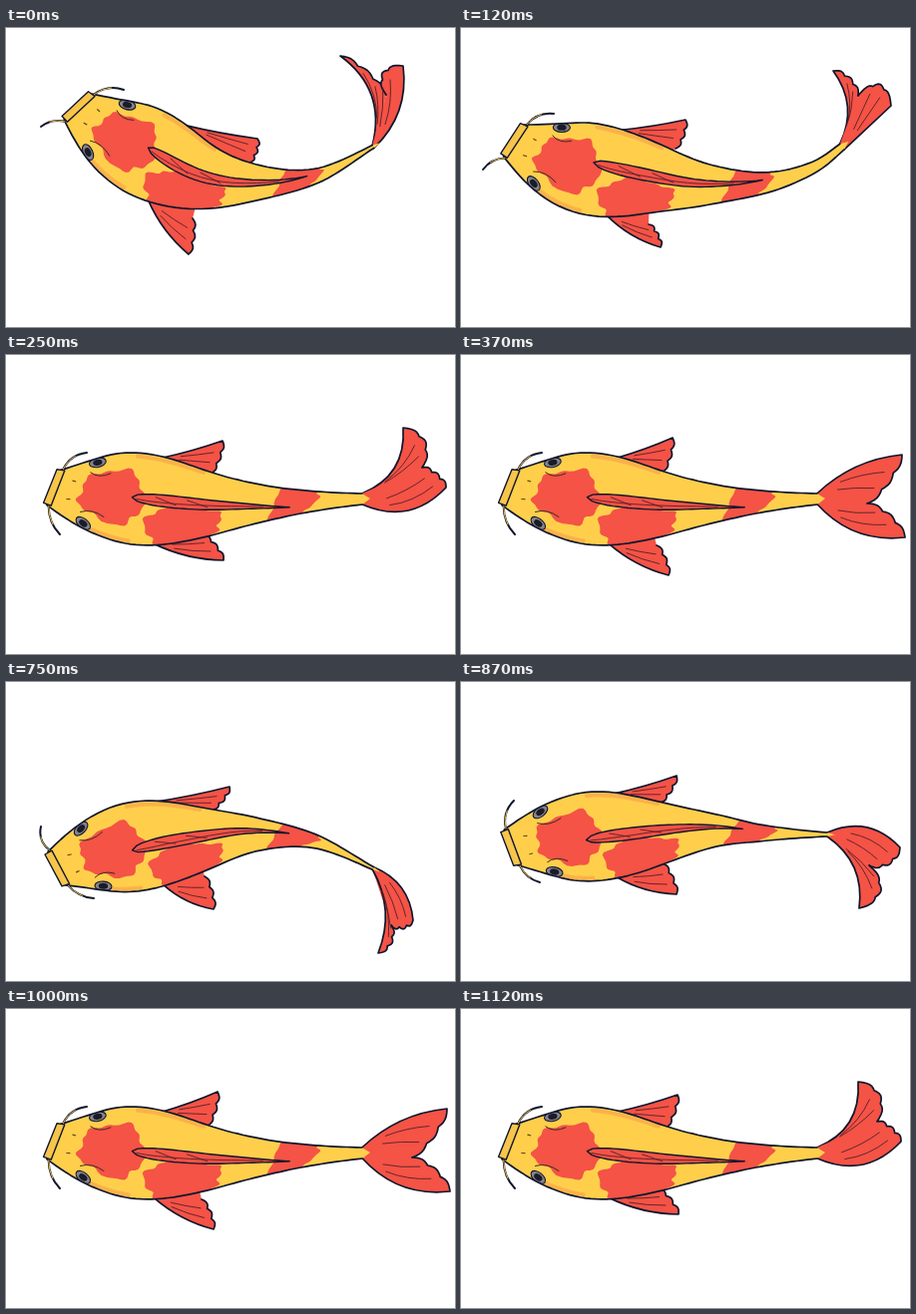
Write an HTML page that moves like this. It is 450 px wide and 300 px high and loops after 1250 ms.

```html
<!DOCTYPE html>
<html lang="en">
<head>
<meta charset="utf-8">
<title>Swimming koi</title>
<style>
html, body { margin: 0; width: 100%; height: 100%; overflow: hidden; background: #fff; }
svg { display: block; width: 100vw; height: 100vh; }
</style>
</head>
<body>
<svg id="stage" viewBox="0 0 450 300"></svg>
<script>
const YELLOW = '#ffcf4b', RED = '#f45346', ORANGE = '#fbb24a', INK = '#10162c';
const LOOP = 1250, PI = Math.PI;

// spine: mouth to tail base; tilt: turn of the mouth; thin: slimming of the rear
// crest: start, end, offset at both, sag; fins: outer and inner corner of each
// tail: tip x, y, bend of the leading edge, bow of the rim
const up = {
  spine: [[72, 79], [125, 116], [190, 147], [250, 155], [312, 148], [368, 119]],
  tilt: 0.2, thin: 3, crest: [82, 250, -5, -2, 4],
  whiskers: [[118, 62], [35, 99]],
  fins: [[[252, 111], [244, 135]], [[183, 227], [187, 191]]],
  tail: [[335, 28, 16, 4], [398, 38, 11, 12]], notch: [381, 67]
};
const rising = {
  spine: [[53, 113], [115, 138], [187, 150], [245, 157], [306, 155], [353, 140], [382, 119]],
  tilt: 0.18, thin: 0, crest: [84, 256, -7, -3, 4],
  whiskers: [[93, 86], [22, 142]],
  fins: [[[225, 92], [215, 121]], [[200, 220], [188, 197]]],
  tail: [[373, 43, 11, 5], [431, 78, 0, 15]], notch: [398, 68]
};
const level = {
  spine: [[48, 133], [120, 143], [190, 149], [250, 149], [300, 147], [357, 144.5]],
  tilt: 0.24, thin: 0, crest: [79, 237, -1, 5, -1],
  whiskers: [[81, 98], [54, 180]],
  fins: [[[212, 83], [202, 117]], [[208, 221], [196, 191]]],
  tail: [[442, 100, -8, 4], [445, 183, 12, 5]], notch: [407, 149]
};
const flick = {
  ...level,
  fins: [[[217, 86], [205, 119]], [[218, 206], [197, 180]]],
  tail: [[398, 73, 14, 12], [441, 133, 15, 3]], notch: [417, 113]
};
const falling = {
  spine: [[50, 166], [120, 156], [175, 153], [250, 149], [300, 151.5], [367, 153]],
  tilt: -0.22, thin: 3, crest: [76, 233, 3, -3, -3],
  whiskers: [[53, 119], [79, 201]],
  fins: [[[216, 94], [199, 121]], [[216, 213], [202, 182]]],
  tail: [[440, 166, -13, 7], [399, 227, -12, 15]], notch: [409, 184]
};
const down = {
  spine: [[51, 187], [120, 167], [190, 158], [250, 153], [310, 160], [368, 187]],
  tilt: -0.2, thin: 3, crest: [78, 236, 3, -3, -3],
  whiskers: [[35, 145], [88, 217]],
  fins: [[[224, 105], [206, 128]], [[208, 228], [199, 195]]],
  tail: [[408, 239, -10, 4], [373, 272, -10, 6]], notch: [386, 244]
};

const timeline = [
  [0, up], [120, rising], [250, flick], [370, level], [620, falling],
  [750, down], [870, falling], [1000, level], [1120, flick]
];

const mix = (p, q, t) => [p[0] + (q[0] - p[0]) * t, p[1] + (q[1] - p[1]) * t];
const shift = (p, n, d) => [p[0] + n[0] * d, p[1] + n[1] * d];
const range = (n, f) => Array.from({ length: n + 1 }, (_, i) => f(i / n));
const poly = pts => 'M' + pts.map(p => p.map(v => v.toFixed(1))).join('L');

function normal(p, q) {
  const dx = q[0] - p[0], dy = q[1] - p[1], len = Math.hypot(dx, dy);
  return [-dy / len, dx / len];
}

// Curve from p to q whose middle lies "bend" off the chord.
const arc = (p, q, bend) =>
  `M${p}Q${shift(mix(p, q, 0.5), normal(p, q), 2 * bend)} ${q}`;

const path = (d, fill, stroke = 'none', width = 0, more = '') =>
  `<path d="${d}" fill="${fill}" stroke="${stroke}" stroke-width="${width}" ${more}/>`;
const ink = (d, width = 1.7) => path(d, 'none', INK, width);

// Catmull-Rom spline through all points.
function spline(pts) {
  return 'M' + pts[0] + pts.slice(1).map((b, i) => {
    const a = pts[i], before = pts[i - 1] || a, after = pts[i + 2] || b;
    const c1 = a.map((v, k) => v + (b[k] - before[k]) / 6);
    const c2 = b.map((v, k) => v - (after[k] - a[k]) / 6);
    return `C${c1} ${c2} ${b}`;
  }).join('');
}

// Half the body width at distance s from the mouth.
const girth = s => s < 85 ? 19 + 27 * Math.sin(PI / 2 * s / 85) : 46 / Math.cosh((s - 85) / 80);

// Maps distance along the spine and side (-1 upper edge, 1 lower edge) to the stage.
function bodyMap(p) {
  const el = document.createElementNS('http://www.w3.org/2000/svg', 'path');
  el.setAttribute('d', spline(p.spine));
  const len = el.getTotalLength();
  const clamp = s => Math.min(len, Math.max(0, s));
  const half = s => girth(s) - p.thin * Math.min(1, s / 200);
  const angle = s => {
    const a = el.getPointAtLength(clamp(s - 3)), b = el.getPointAtLength(clamp(s + 3));
    return Math.atan2(b.y - a.y, b.x - a.x) + p.tilt * Math.max(0, 1 - s / 60);
  };
  const place = (s, side) => {
    const c = clamp(s), { x, y } = el.getPointAtLength(c), a = angle(c);
    const along = s - c, off = side * half(c);
    return [x + along * Math.cos(a) - off * Math.sin(a), y + along * Math.sin(a) + off * Math.cos(a)];
  };
  return { len, half, angle, place };
}

// Fin with a bent leading edge, a scalloped rim and rays.
function fan(root, tip, end, back, bend, bow) {
  const n = normal(tip, end), mid = mix(tip, end, 0.5);
  const out = Math.sign(n[0] * (mid[0] - root[0]) + n[1] * (mid[1] - root[1]));
  const rim = t => shift(mix(tip, end, t), n,
    out * (4 * bow * t * (1 - t) + 2.5 * Math.abs(Math.sin(3 * PI * t))));
  const edge = arc(root, tip, bend) + poly(range(18, rim)).replace('M', 'L');
  const rays = [0.3, 0.65].map(t => arc(root, rim(t), bend * (1 - t)));
  return path(edge + 'L' + back, RED) + ink(edge) +
    rays.map(d => path(d, 'none', '#54202a', 0.9,
      'pathLength="10" stroke-dasharray="5.5 20" stroke-dashoffset="-3.2"')).join('');
}

// Wobbly patch on the skin; "lean" slants it.
function patch(place, s, side, long, wide, seed, lean = 0) {
  const soft = v => Math.sign(v) * Math.abs(v) ** 0.8;
  return path(poly(range(60, t => {
    const a = 2 * PI * t;
    const r = 1 + 0.08 * Math.sin(5 * a + seed) + 0.05 * Math.sin(11 * a + 2 * seed);
    const v = side + wide * r * soft(Math.sin(a));
    return place(s + long * r * soft(Math.cos(a)) - lean * v, v);
  })) + 'Z', RED);
}

function crest({ place, half }, [from, to, d0, d1, sag]) {
  const at = (t, side) => {
    const s = from + (to - from) * t;
    const off = d0 + (d1 - d0) * t + sag * Math.sin(PI * t);
    return place(s, (off + side * 6 * Math.sin(PI * Math.sqrt(t))) / half(s));
  };
  const edge = side => range(30, t => at(t, side));
  const ray = t => arc(at(t, -0.5), at(t + 0.13, 0.5), 0);
  return path(poly([...edge(-1), ...edge(1).reverse()]), RED, INK, 1.4) +
    path(poly(range(12, t => at(0.03 + 0.8 * t, 0.4 - t * 0.4))) + [0.15, 0.35].map(ray).join(''),
      'none', '#54202a', 0.9);
}

function eye({ place, angle }, side) {
  const [x, y] = place(37, side * 0.87);
  const turn = angle(37) * 180 / PI + side * 25;
  return `<g transform="translate(${x} ${y}) rotate(${turn})">
    <ellipse rx="8.5" ry="4.7" fill="#85848c" stroke="${INK}" stroke-width="1.1"/>
    <ellipse rx="4.7" ry="3" fill="#1b1b29"/></g>`;
}

function face(map, side) {
  const { place } = map;
  const brow = `M${place(32, side * 0.6)}Q${place(42, side * 0.4)} ${place(54, side * 0.53)}`;
  const nostril = arc(place(16, side * 0.36), place(19, side * 0.33), 0);
  return path(brow, 'none', '#3a2b20', 1) + path(nostril, 'none', '#6b4a20', 1.2);
}

function whisker(root, tip, bend) {
  const d = arc(root, tip, bend);
  return ink(d, 2) + path(d, 'none', '#e5b84a', 1, 'pathLength="10" stroke-dasharray="6 20"');
}

function koi(p, id) {
  const map = bodyMap(p), { place, len } = map;
  const sides = [-1, 1];
  const [top, low] = sides.map(v => range(60, t => place(len * t, v)));
  const body = poly([...top, place(len + 8, 0), ...low.reverse()]) + 'Z';
  const roots = sides.map(v => place(len, v));
  const band = (from, to, v) => poly(range(10, t => place(from + (to - from) * t, v)));
  const lip = poly([place(-4, -0.95), place(4, -0.9), place(4, 0.9), place(-4, 0.95)]) + 'Z';

  const fins = sides.map((v, i) =>
    fan(place(105, v * 0.97), ...p.fins[i], place(145, v * 0.6), i ? 4 : 1, 2));
  const tail = p.tail.map(([x, y, bend, bow], i) =>
    fan(roots[i], [x, y], p.notch, roots[1 - i], bend, bow));
  const skin = path(band(80, 150, -0.92) + band(45, 80, 0.93), 'none', ORANGE, 4) +
    patch(place, 58, 0, 32, 0.62, 1) +
    patch(place, 132, 0.58, 37, 0.48, 4) +
    patch(place, 242, 0, 21, 1.4, 2, 8) +
    sides.map(v => eye(map, v)).join('');

  return `<clipPath id="${id}"><path d="${body}"/></clipPath>` +
    fins.join('') + tail.join('') + path(body, YELLOW) +
    `<g clip-path="url(#${id})">${skin}</g>` +
    ink(poly(top) + poly(low)) +
    crest(map, p.crest) +
    sides.map((v, i) => whisker(place(2, v), p.whiskers[i], i ? 3 : -4) + face(map, v)).join('') +
    path(lip, '#f7c54a', INK, 1.4);
}

const stage = document.getElementById('stage');
const poses = [up, rising, flick, level, falling, down];
stage.innerHTML = poses.map((p, i) =>
  `<g visibility="hidden" stroke-linecap="round" stroke-linejoin="round">${koi(p, 'body' + i)}</g>`).join('');
const groups = [...stage.children];

function draw(ms) {
  const t = ms % LOOP;
  const pose = timeline.filter(step => step[0] <= t).pop()[1];
  groups.forEach((g, i) => g.setAttribute('visibility', poses[i] === pose ? 'visible' : 'hidden'));
}

const start = performance.now();
function tick() {
  draw(performance.now() - start);
  requestAnimationFrame(tick);
}
tick();
</script>
</body>
</html>
```
